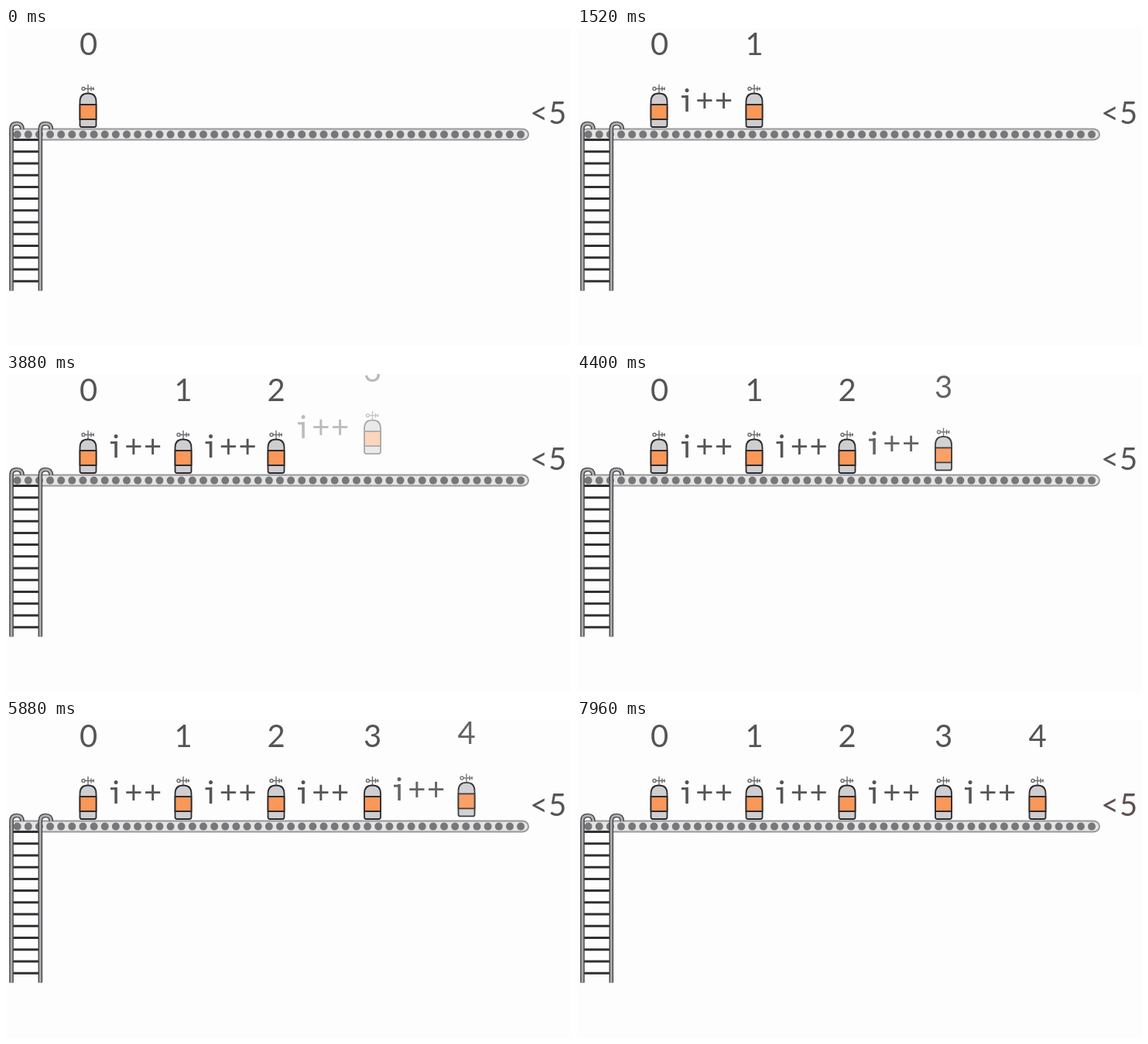
An HTML page that plays this animation: 730x411 px, repeating every 8000 ms.

```html
<!DOCTYPE html>
<html lang="en">
<head>
<meta charset="utf-8">
<title>Loop counter</title>
<style>
  html, body { margin: 0; width: 100%; height: 100%; overflow: hidden; background: #fefdfe; }
  svg { display: block; width: 730px; height: 411px; }
  text { font: 40px Lato, "Open Sans", sans-serif; fill: #565456; text-anchor: middle; }

  .step { animation: 8s linear infinite both; }
  .s1 { animation-name: drop1; }
  .s2 { animation-name: drop2; }
  .s3 { animation-name: drop3; }
  .s4 { animation-name: drop4; }
  .limit { animation: alert 8s linear infinite; }

  @keyframes drop1 {
    0%, 6.5% { opacity: 0; transform: translateY(-41px); }
    19%, 100% { opacity: 1; transform: none; }
  }
  @keyframes drop2 {
    0%, 25% { opacity: 0; transform: translateY(-41px); }
    37.5%, 100% { opacity: 1; transform: none; }
  }
  @keyframes drop3 {
    0%, 43.6% { opacity: 0; transform: translateY(-41px); }
    56.1%, 100% { opacity: 1; transform: none; }
  }
  @keyframes drop4 {
    0%, 62.1% { opacity: 0; transform: translateY(-41px); }
    74.6%, 100% { opacity: 1; transform: none; }
  }
  @keyframes alert {
    0%, 81.25%, 100% { fill: #565456; }
    90.625% { fill: #f00; }
  }
</style>
</head>
<body>
<svg viewBox="0 0 730 411">
  <defs>
    <g id="tank">
      <g fill="none" stroke="#6c6b6d" stroke-width="1.4">
        <path d="M0 73V84M-4 78.5H8M4 75.5V81.5M7 76.5V80.5"/>
        <circle cx="-6" cy="78.5" r="2"/>
      </g>
      <g stroke="#2d2b2d" stroke-width="1.8">
        <path fill="#cecdcf" d="M-10.5 95C-10.5 88-6.500 84.500 0 84.500S10.500 88 10.500 95V125.500Q10.500 128 8 128H-8Q-10.500 128-10.500 125.500Z"/>
        <path fill="#fa9859" d="M-10.500 99H10.500V118H-10.500Z"/>
      </g>
    </g>
    <g id="inc">
      <text x="8" y="107.500">i</text>
      <path fill="#565456" d="M1 87.200H8V90.200H1Z"/>
      <text x="30.800 55.600" y="107.500">++</text>
    </g>
    <path id="rail" d="M7 339.500V130Q7 123.500 14 123.500T21 131"/>
  </defs>

  <!-- conveyor -->
  <rect x="5" y="130.500" width="670" height="14" rx="8" ry="7" fill="#e5e4e5" stroke="#98979a" stroke-width="2"/>
  <path d="M14.600 137.600H665.500" stroke="#777678" stroke-width="10" stroke-linecap="round" stroke-dasharray="0 14.140"/>

  <!-- ladder -->
  <path d="M25.500 143V330" stroke="#312f31" stroke-width="33" stroke-dasharray="3 12.220"/>
  <g fill="none">
    <g stroke="#454446" stroke-width="5.600">
      <use href="#rail"/><use href="#rail" x="37.300"/>
    </g>
    <g stroke="#adacae" stroke-width="2.800">
      <use href="#rail"/><use href="#rail" x="37.300"/>
    </g>
  </g>

  <text class="limit" x="688.500 712.500" y="123.500">&lt;5</text>

  <g>
    <text x="106.500" y="34.500">0</text>
    <use href="#tank" x="106"/>
  </g>
  <g class="step s1">
    <use href="#inc" x="134"/>
    <text x="229" y="34.500">1</text>
    <use href="#tank" x="229"/>
  </g>
  <g class="step s2">
    <use href="#inc" x="256.500"/>
    <text x="349" y="34.500">2</text>
    <use href="#tank" x="349"/>
  </g>
  <g class="step s3">
    <use href="#inc" x="376"/>
    <text x="473.500" y="34.500">3</text>
    <use href="#tank" x="473.500"/>
  </g>
  <g class="step s4">
    <use href="#inc" x="500"/>
    <text x="595" y="34.500">4</text>
    <use href="#tank" x="595"/>
  </g>
</svg>
</body>
</html>
```
